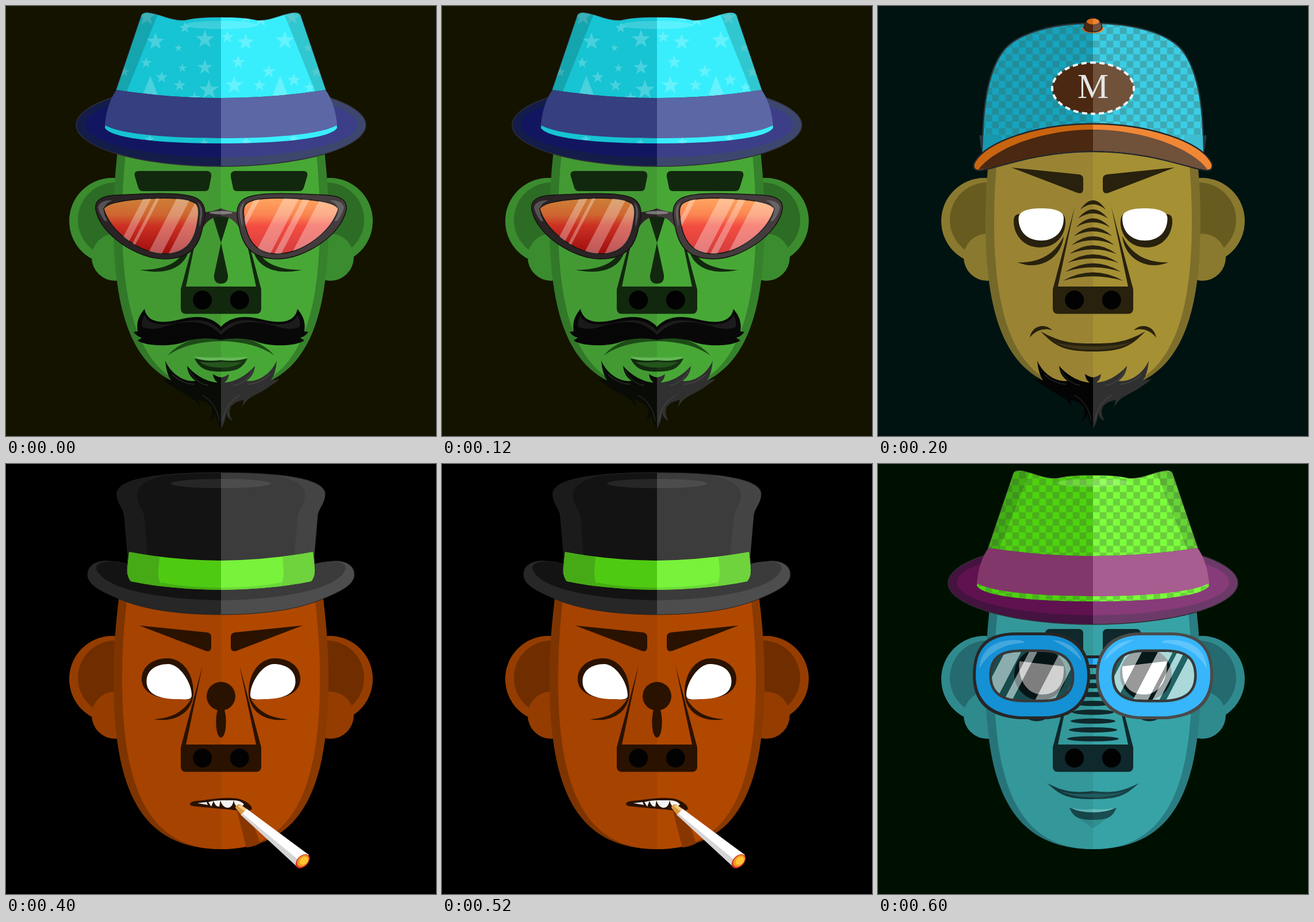
An HTML page for the animation above (800 ms loop, 748 by 748 pixels).

```html
<!DOCTYPE html>
<html lang="en">
<head>
<meta charset="utf-8">
<title>Masks</title>
<style>
html, body { margin: 0; width: 100%; height: 100%; overflow: hidden; background: #000; }
svg { display: block; width: 100vw; height: 100vh; }
</style>
</head>
<body>
<svg id="stage" viewBox="0 0 748 748"></svg>
<script>
const STEP = 200;
const stage = document.getElementById('stage');

// Shapes are given as their left half; pair() mirrors them about x = 374.
const path = (d, fill, extra = '') => `<path d="${d}" fill="${fill}" ${extra}/>`;
const flip = s => `<g transform="matrix(-1 0 0 1 748 0)">${s}</g>`;
const pair = (d, l, r = l, extra = '') => path(d, l, extra) + flip(path(d, r, extra));
const oval = (cy, rx, ry) => `M374 ${cy - ry}A${rx} ${ry} 0 0 0 374 ${cy + ry}`;
const disc = (x, y, r) => `M${x - r} ${y}a${r} ${r} 0 1 0 ${2 * r} 0a${r} ${r} 0 1 0 ${-2 * r} 0`;
const clip = (id, s) => `<g clip-path="url(#${id})">${s}</g>`;
const line = (c, w) => `stroke="${c}" stroke-width="${w}" stroke-linejoin="round"`;
const bars = list => list.map(([x, w]) => `M${x} 325h${w}l-60 115h${-w}Z`).join('');

function star([x, y, r]) {
  let d = '';
  for (let i = 0; i < 10; i++) {
    const a = i * Math.PI / 5, q = i % 2 ? r * .4 : r;
    d += (i ? 'L' : 'M') + (x + q * Math.sin(a)).toFixed(1) + ' ' + (y - q * Math.cos(a)).toFixed(1);
  }
  return d + 'Z';
}

const HEAD = 'M374 200H201Q187 290 187 374C187 560 230 670 374 670';
const FACE = 'M374 200H215Q202 290 202 374C202 560 246 670 374 670';
const CROWN = 'M374 160Q283 160 192 146L236 16Q239 11 248 12C268 14 288 27 312 25C335 20 352 20 374 20';
const SLIVER = 'M374 239C290 239 185 233 172 212L174 200H374';
const CAP = 'M374 235H182C183 185 188 122 215 82C240 45 310 30 374 30';
const LENS = 'M170 353C175 342 210 337 250 335C290 333 322 335 331 345C337 352 335 365 331 385C325 412 310 431 275 431C232 430 182 393 170 353Z';
const GOGGLE = 'M198 368C198 340 212 327 250 327H285C320 327 337 342 337 370C337 398 318 410 285 410H255C215 410 198 396 198 368Z';

const half = (id, d) => `<clipPath id="${id}"><path d="${d}"/></clipPath>
<clipPath id="${id}R"><path d="${d}" transform="matrix(-1 0 0 1 748 0)"/></clipPath>`;

const defs = `<defs>
${half('crown', CROWN + 'Z' + SLIVER + 'Z')}${half('lens', LENS)}${half('goggle', GOGGLE)}
<clipPath id="glare"><path d="${bars([[222, 28], [264, 14], [318, 34], [366, 60]])}"/></clipPath>
<clipPath id="glareR"><path d="${bars([[434, 26], [488, 26], [522, 12], [546, 80]])}"/></clipPath>
<pattern id="checks" x="374" y="2" width="23.4" height="23.4" patternUnits="userSpaceOnUse">
<path d="M0 0h11.7v23.4h11.7v-11.7h-23.4z" fill="rgb(66,82,62)" fill-opacity=".28"/></pattern>
<linearGradient id="redL" x2="0" y2="1"><stop stop-color="#cd8038"/><stop offset=".3" stop-color="#cf6630"/><stop offset=".5" stop-color="#cb3022"/><stop offset="1" stop-color="#9f0d0d"/></linearGradient>
<linearGradient id="redR" x2="0" y2="1"><stop stop-color="#ffa65f"/><stop offset=".3" stop-color="#fb8551"/><stop offset=".5" stop-color="#f34d41"/><stop offset="1" stop-color="#d43b3c"/></linearGradient>
</defs>`;

function head(c) {
  return `<rect width="748" height="748" fill="${c.bg}"/>` +
    pair(disc(185, 374, 75), c.ear) + pair(disc(190, 372, 65), c.inner) +
    path(disc(190, 437, 41), c.ear) + path(disc(564, 437, 41), c.ear) +
    pair(HEAD, c.edge[0], c.edge[1]) + pair(FACE, c.face[0], c.face[1]) +
    pair('M374 488H313L342 350 304 493V526Q304 535.5 313 535.5H374', c.dark) +
    pair(disc(341.7, 511.5, 16.5), '#020202');
}

function fedora(c, trim) {
  return pair(oval(207, 252, 72), ...c.rim, line('#302e35', 1.5)) +
    pair(oval(206, 237, 57), ...c.brim) +
    pair(CROWN, 'none', 'none', line('#333', 2)) +
    pair(SLIVER, ...c.crown) + pair(CROWN, ...c.crown) +
    clip('crown', trim) + clip('crownR', trim) +
    pair('M192 146L236 16Q239 11 248 12L264 14 210 149Z', '#132b20', '#132b20', 'opacity=".2"') +
    pair(oval(33, 63, 7), '#fff', '#fff', 'opacity=".17"') +
    pair('M374 160Q283 160 192 146C180 163 174 185 172 207C200 225 300 230 374 230', ...c.band);
}

const beard = (l, r) => pair('M374 646Q366 645 360 640Q361 650 368 655C348 654 328 641 315 626C316 638 322 647 330 652C310 655 287 640 277 617Q279 640 287 651L272 649Q280 656 290 662C308 676 328 678 337 698Q336 690 334 685Q350 688 357 697Q362 708 354 722Q364 716 365 708Q366 723 374 735', l, r) +
  pair('M318 632Q330 657 352 660M341 677Q366 690 371 722M289 641Q306 657 328 658', 'none', 'none', 'stroke="#777" stroke-width="1.3" opacity=".3"');

const angryBrow = 'M232 281L350 293Q357 294 357 301V318Q357 328 347 325Z';

function green() {
  const dark = '#12280e';
  const stars = [[245,19,16],[260,62,16],[346,58,17],[300,73,7],[311,38,10],[244,99,10],[346,107,14],[307,108,8],[271,124,11],[302,138,11],[353,146,18],[206,115,9],[328,160,11],[417,63,15],[485,60,17],[404,98,12],[397,138,16],[457,114,12],[501,129,12],[441,138,11],[525,73,8],[540,115,10],[418,20,10],[385,54,11],[443,24,13],[498,20,13],[528,142,10],[250,232,9],[345,238,8],[418,237,10],[500,231,9]];
  const trim = path(stars.map(star).join('') + 'M251 121L266 160H236ZM477 121L492 160H462Z', '#fff', 'opacity=".22"');
  const glass = '#2a2425', rim = '#443c3d';
  return head({ bg: '#141300', face: ['#439a33', '#48a836'], edge: ['#327829', '#36812b'], ear: '#3a8c2f', inner: '#2d6c24', dark }) +
    pair('M231 287H349Q358 287 357 297L353 317Q352 322 346 322H238Q232 322 230 316L224 296Q222 287 231 287Z', dark) +
    pair('M233 459C270 459 292 450 304 435L317 429C305 461 270 467 233 459Z', dark) +
    pair('M374 364H359L374 412 362 468Q361 483 374 483', dark) +
    pair('M374 583Q315 584 281 608Q310 574 374 574', '#1d4c17') +
    pair('M374 611C355 612 342 611 327 610Q345 620 374 620', '#65b657') +
    pair('M374 616C355 618 345 617 328 613C337 632 350 636 374 636', '#12280e', '#163411') +
    pair('M374 619Q352 621 337 619Q348 629 374 629', '#24551d') +
    beard('#080b06', '#303030') +
    pair('M374 558C360 542 337 537 308 544C280 551 247 556 241 527C229 541 227 553 229 566L222 567Q228 575 236 577L229 582C245 592 285 593 309 585C332 577 354 577 374 581', '#060606', '#080808') +
    pair('M374 565C358 547 336 543 308 549C275 557 247 556 241 537Q235 548 237 558Q252 565 272 559Q300 549 325 550Q352 550 374 572', '#191919', '#1c1c1c') +
    pair('M374 352Q360 358 340 359L342 386Q354 366 374 366', glass, rim) +
    pair('M156 354C154 338 165 331 190 329C280 324 322 325 337 338C348 348 348 362 342 385C336 418 320 440 275 440C230 440 165 400 156 354Z', glass, rim, line('#151112', 1.5)) +
    pair('M160 350Q164 337 185 338Q166 345 172 365Q180 379 171 373Q162 361 160 350ZM333 341Q345 349 340 371Q335 398 337 366Q339 352 333 341Z', '#aaa', '#aaa', 'opacity=".35"') +
    pair(LENS, 'url(#redL)', 'url(#redR)', line('#181213', 1.5)) +
    clip('lens', path(bars([[244, 14], [266, 6], [302, 24], [338, 50]]), '#fff', 'opacity=".3"')) +
    clip('lensR', path(bars([[438, 9], [488, 27], [522, 12], [552, 60]]), '#fff', 'opacity=".32"')) +
    pair(oval(359.5, 20, 3), '#777', '#857e80') +
    fedora({ rim: ['#141d49', '#3d476e'], brim: ['#121661', '#3c3e88'], crown: ['#16c4d3', '#39eefc'], band: ['#363f7f', '#5c67a6'] }, trim);
}

function olive() {
  const dark = '#28210d';
  let folds = '';
  for (let i = 0; i < 9; i++) {
    const w = 22 + 3.8 * i, y = 354 + 15.5 * i, h = 32 - .3 * i;
    folds += `M${374 - w} ${y}Q374 ${y - h} ${374 + w} ${y}Q374 ${y - h + 14} ${374 - w} ${y}Z`;
  }
  return head({ bg: '#001311', face: ['#9a8433', '#a59034'], edge: ['#75692a', '#7e6e2b'], ear: '#8a7a2f', inner: '#685b20', dark }) +
    pair(angryBrow, dark) + path(folds, dark) +
    pair('M236 374Q236 362 246 362H321Q327 366 326 380C323 406 304 420 281 420C255 420 236 400 236 374Z', dark) +
    pair('M244.5 369C245 356 263 352 284 352C306 352 323 356 323 369C323 395 305 408 284 408C262 408 244.5 395 244.5 369Z', '#fff') +
    pair('M243 446C285 447 310 428 323 400C320 437 283 462 243 446Z', dark) +
    pair('M264 577C268 554 292 552 303 564C290 560 275 563 264 577Z', dark) +
    pair('M374 587C340 587 318 586 283 566C308 592 323 601 374 601', dark) +
    pair('M374 592Q329 592 306 584Q330 598 374 598', '#40371a') +
    beard('#040404', '#303030') +
    pair(CAP, '#16a3be', '#3bcde5', line('#26343b', 2.5)) + pair(CAP, 'url(#checks)') +
    path('M182 225H176L181 258 210 245ZM566 225H572L567 258 538 245Z', '#26343b') +
    path('M183 225L182 255 215 240V225Z', '#1797b0') + path('M565 225L566 255 533 240V225Z', '#3cbdd2') +
    pair('M374 47Q356 47 355 39Q358 34 374 34', '#c9640f', '#ee8534') +
    pair('M374 45Q360 45 358 37Q362 21 374 21', '#4a2813', '#70513a', line('#222', 1.5)) +
    pair(oval(27, 11, 5), '#d46b12', '#ee8534') +
    pair(oval(143, 71, 44.5), '#4a2812', '#70513a') +
    pair(oval(143, 71, 44.5), 'none', 'none', 'stroke="#f4f4f4" stroke-width="4" stroke-dasharray="9 6.3" stroke-dashoffset="4"') +
    '<text x="374" y="160" font-family="\'Liberation Serif\', serif" font-size="61" text-anchor="middle" fill="#e4e4e4">M</text>' +
    pair('M374 205C280 205 185 235 167 274Q164 286 176 286C198 286 268 253 374 253', '#c9640f', '#f08735', line('#22252a', 2.5)) +
    pair('M374 215C290 215 205 245 175 284C200 285 268 252 374 252', '#4a2812', '#70513a');
}

function orange() {
  const dark = '#2a1200';
  return head({ bg: '#000', face: ['#a64300', '#b14800'], edge: ['#7e3400', '#8a3900'], ear: '#953d00', inner: '#702e00', dark }) +
    pair(angryBrow, dark) +
    pair('M236 374C236 352 256 338 280 338C306 338 326 362 326 398Q326 410 316 410L270 406C248 402 236 390 236 374Z', dark) +
    pair('M244.5 378C244.5 358 262 348 282 348C302 348 323 380 323 402C323 410 316 410 300 409C265 409 244.5 400 244.5 378Z', '#fff') +
    pair('M257 444C290 442 312 430 326 402C322 436 290 450 257 444Z', dark) +
    path(disc(374, 404, 25), dark) + pair('M374 420C363 421 362 475 374 476', dark) +
    path('M400 597L418 667Q430 666 442 660L436 642Q426 618 412 608Z', '#873600') +
    path('M320 591Q321 587 331 586C350 585 370 580 392 581C412 581 428 592 428 600Q422 606 408 603C380 600 340 597 325 595Q320 594 320 591Z', dark) +
    path('M333 590L349 588 351 593ZM352 588L361 586 357 596ZM361 586L373 585 371 596Q364 596 361 586ZM373 585H396Q394 598 385 598Q376 597 373 585ZM396 585Q408 585 414 592L407 599Q398 597 396 585Z', '#f4f4f4') +
    path('M399 598Q400 591 407 592L420 601 410 611Z', '#d99a45') +
    path('M408 593L420 601 416 605 403 595Z', '#f5c983') +
    path('M419 600L527 680 507 701 409 610Z', '#fff') +
    path('M411 608L514 693 507 701 408 610Z', '#d5d5d5') +
    '<g transform="translate(516 691) rotate(-45)"><ellipse rx="14.5" ry="9.5" fill="#d9332b"/><ellipse cx="1" rx="12" ry="8" fill="#f09a21"/><ellipse cx="2" cy="1" rx="8" ry="6" fill="#ffc732"/></g>' +
    pair('M374 262C320 262 250 257 200 236C164 221 142 210 142 192C142 175 160 167 180 169Q198 170 212 174L374 180', '#272727', '#4d4d4d', line('#222', 1)) +
    pair('M374 237C290 237 170 222 157 182Q157 168 188 170L214 174 374 180', '#131313', '#3b3b3b') +
    pair('M374 190H210L212 160 206 90C205 78 193 68 193 52C193 25 270 15 374 15', '#131313', '#3c3c3c', line('#2a2a2a', 1)) +
    pair('M211 180L212 160 206 90C205 78 193 68 193 52C194 35 230 24 278 19Q228 32 228 52C228 75 241 80 241 95L248 180Z', '#1b1b1b', '#444') +
    pair(oval(34, 87, 8), '#262626', '#4c4c4c') +
    pair('M374 168Q290 167 214 153L211 182Q210 195 217 204Q293 219 374 219', '#4fca13', '#78f23b') +
    pair('M267 162L214 153 211 182Q210 195 217 204Q245 210 272 213Q264 203 265 185Z', '#46aa16', '#6ed33c') +
    pair('M374 219Q320 218 272 213L269 206Q315 215 374 215', '#44ad13', '#6bd938');
}

function teal() {
  const dark = '#0f282b';
  let folds = '';
  for (let i = 0; i < 8; i++) folds += pair(oval(478 - 15.4 * i, 45 - 3 * i, 4.6), dark);
  // The lens dims what is behind it; the glare bars show it undimmed and whitened.
  const eyes = pair(GOGGLE, '#34979a', '#37a3a6') + pair(disc(282, 366, 45), dark) +
    pair('M246 343L323 352C325 385 310 401 285 401C258 401 242 372 246 343Z', '#fff');
  const lens = side => clip('goggle' + side, eyes + pair(GOGGLE, '#000', '#000', 'opacity=".4"') +
    clip('glare' + side, eyes + pair(GOGGLE, '#fff', '#fff', 'opacity=".58"')));
  return head({ bg: '#001000', face: ['#34979a', '#37a3a6'], edge: ['#26747a', '#2a7d82'], ear: '#2f8a8e', inner: '#246a6e', dark }) +
    pair('M299 287H349Q357 287 357 295V325H291V295Q291 287 299 287Z', dark) + folds +
    pair('M256 441Q276 454 296 441Z', dark) +
    pair('M374 569C350 571 330 574 294 555C318 578 333 583 374 583', '#143a3d', '#174447') +
    pair('M374 573Q340 577 317 569Q340 580 374 580', '#205c60') +
    pair('M343 612L374 634V612Z', '#2d878b', '#30908f') +
    pair('M374 603C360 606 352 603 333 598C340 614 348 619 374 619', '#164549', '#194d51') +
    pair('M374 600C362 602 350 601 335 598Q350 606 374 606', '#5bafb2', '#68babc') +
    pair('M374 333H358V355H374', '#222') + pair('M374 338H358V349H374', '#1691d5', '#35b4fa') +
    pair('M165 368C165 318 187 293 240 293H290C343 293 369 322 369 368C369 414 342 444 287 444H247C190 440 165 414 165 368Z', '#262626', '#4a4a4a') +
    pair('M170 367C170 322 190 298 240 298H290C339 298 364 326 364 368C364 410 338 439 287 439H247C195 435 170 410 170 367Z', '#1490d4', '#37b6fb') +
    pair('M176 356Q180 309 235 306Q254 306 255 311Q200 313 176 356ZM303 306Q342 309 355 343Q332 319 303 306Z', '#fff', '#fff', 'opacity=".2"') +
    pair(GOGGLE, '#222', '#444', line('#383838', 9)) + lens('') + lens('R') +
    path(GOGGLE, '#000', 'opacity=".18"') +
    fedora({ rim: ['#44133f', '#6c3a68'], brim: ['#5f124f', '#873b78'], crown: ['#4ed30f', '#7cff3c'], band: ['#82376a', '#a75d8f'] },
      '<rect width="748" height="300" fill="url(#checks)"/>');
}

stage.innerHTML = defs + [green, olive, orange, teal].map(f => `<g class="mask">${f()}</g>`).join('');
const masks = [...document.querySelectorAll('.mask')];
const start = performance.now();

function draw(now) {
  const current = Math.floor(Math.max(0, now - start) / STEP) % masks.length;
  masks.forEach((m, i) => m.style.display = i === current ? '' : 'none');
  requestAnimationFrame(draw);
}
draw(start);
</script>
</body>
</html>
```
